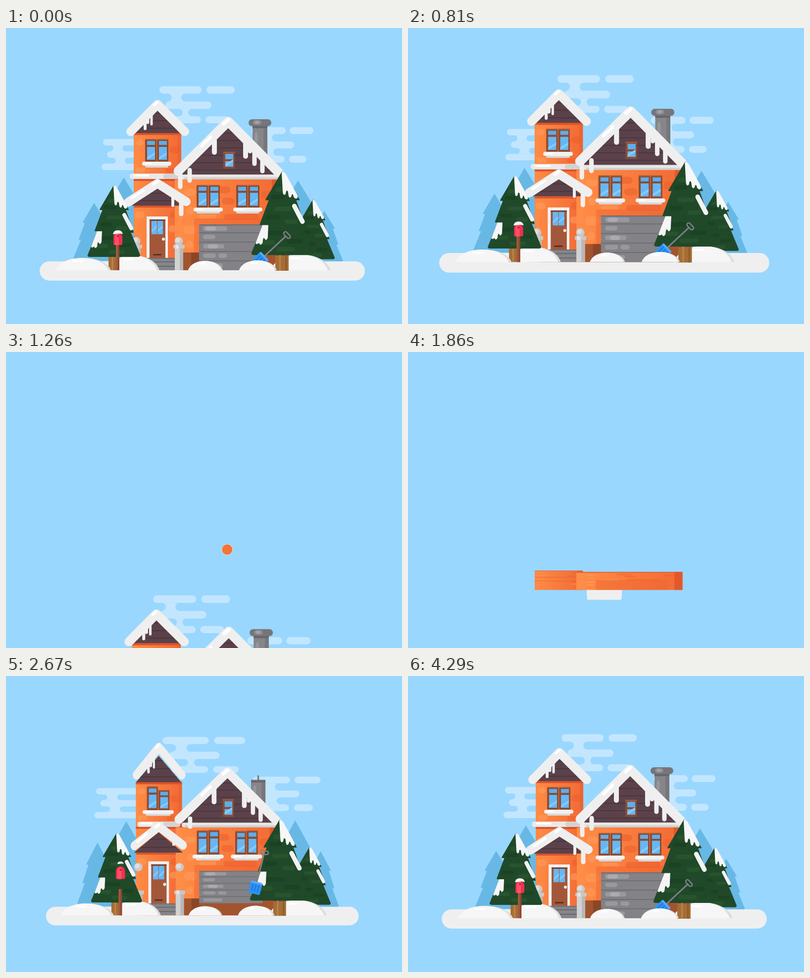
An HTML page for the animation above (4320 ms loop, 800 by 600 pixels).

```html
<!DOCTYPE html>
<html lang="en">
<head>
<meta charset="utf-8">
<title>Winter house</title>
<style>
html, body { margin: 0; width: 100%; height: 100%; overflow: hidden; background: #99d7ff; }
svg { display: block; width: 100vw; height: 100vh; }
</style>
</head>
<body>
<svg id="stage" viewBox="0 0 800 600"></svg>
<script>
const LOOP = 4320;
const EXIT_END = 1420;
const SNOW = '#efefef';

// Shape helpers
const rect = (x, y, w, h, fill, r = 0, extra = '') =>
  `<rect x="${x}" y="${y}" width="${w}" height="${h}" rx="${r}" fill="${fill}" ${extra}/>`;
const pill = (x1, x2, y, h, fill, extra) => rect(x1, y, x2 - x1, h, fill, h / 2, extra);
const path = (d, fill, extra = '') => `<path d="${d}" fill="${fill}" ${extra}/>`;
const line = (d, color, width) =>
  path(d, 'none', `stroke="${color}" stroke-width="${width}" stroke-linecap="round" stroke-linejoin="round"`);
const group = (id, body) => `<g id="${id}">${body}</g>`;
// A part that springs open around (cx, cy) at a start time
const pop = (cx, cy, start, mode, body) => `<g data-pop="${cx} ${cy} ${start} ${mode}">${body}</g>`;
const drip = (x, y1, y2, w, start = 2300) =>
  pop(x, y1, start, 'y', line(`M${x} ${y1}V${y2}`, SNOW, w));

const CLOUD = '#c3e6ff';
const neck = (x1, x2, y, h) => {
  const r = h / 2;
  return path(`M${x1 - r} ${y}a${r} ${r} 0 0 1 0 ${h}H${x2 + r}a${r} ${r} 0 0 1 0 ${-h}z`, CLOUD);
};
const puff = (x1, x2, y, h) => pill(x1, x2, y, h, CLOUD);

function clouds() {
  const middle = puff(310, 395, 118, 15) + puff(405, 462, 118, 15) + neck(335, 354, 133, 16) +
    puff(322, 415, 149, 15) + neck(357, 368, 164, 15) + puff(326, 394, 179, 14) + puff(403, 450, 179, 14);
  const left = puff(196, 300, 225, 13) + neck(217, 235, 238, 12) + puff(204, 300, 250, 13) +
    neck(222, 240, 263, 12) + puff(193, 300, 275, 13);
  const right = puff(496, 565, 201, 14) + puff(573, 621, 201, 14) + neck(515, 537, 215, 15) +
    puff(500, 582, 230, 14) + neck(515, 540, 244, 15) + puff(500, 563, 259, 14) + puff(572, 607, 259, 14);
  return group('cloudM', pop(386, 155, 2390, 'x', middle)) +
    group('cloudL', pop(252, 256, 2390, 'x', left)) +
    group('cloudR', pop(560, 237, 2390, 'x', right));
}

// Trees are drawn 143 units high with the tip at the origin
const TREE = 'M0 0L29 48H23L39 94H33L52 140Q52 143 49 143H-49Q-53 143 -52 140L-32 91H-38L-22 48H-28z';
const place = (x, y, h, body) => `<g transform="translate(${x} ${y}) scale(${h / 143})">${body}</g>`;

const blueTree = (x, y, h, start) => pop(x, y + h, start, 'y',
  place(x, y, h, path(TREE, '#68b8e5', 'stroke="#68b8e5" stroke-width="2" stroke-linejoin="round"')));

function greenTree(x, y, h, start) {
  const bands = [[-12, 12, 26], [-20, 4, 39], [-14, 16, 60], [-28, -4, 74], [4, 27, 82],
    [-26, 8, 102], [-38, -12, 118], [8, 36, 116], [-10, 22, 130]]
    .map(([a, b, top], i) => pill(a, b, top, 8, i % 2 ? '#193f20' : '#2d5a30', 'opacity=".6"')).join('');
  const snow = path('M-1 0Q3 -2 7 5L26 40Q28 46 24 46Q20 46 19 40Q17 36 16 42Q13 47 11 41L10 34Q7 29 6 38Q2 42 1 35z', '#f7f7f7') +
    line('M21 59L35 86', '#f2f2f2', 8) +
    path('M-34 92H-24L-25 114Q-28 121 -31 115Q-33 112 -34 123Q-38 129 -40 123Q-45 127 -46 123z', '#f5f5f5');
  return pop(x, y + h, start, 'xy', place(x, y, h, path(TREE, '#20492a',
    'stroke="#20492a" stroke-width="2" stroke-linejoin="round"') + bands + snow));
}

const trunk = (x, y, w, h) => pop(x + w / 2, y + h, 2200, 'y',
  rect(x, y, w, h, '#a56d36') + rect(x, y, w, 4, '#7d4d26') + rect(x + w * .3, y, 3, h, '#b9854a') +
  rect(x + w * .75, y, 3, h, '#8d5b2c'));

function mound(x, w, h) {
  const hump = w => `M${x} 491C${x + w * .12} ${491 - h * 1.33} ${x + w * .88} ${491 - h * 1.33} ${x + w} 491z`;
  return pop(x + w / 2, 491, 2250, 'xy', path(hump(w), '#dedede') + path(hump(w * .95), '#f6f6f6') +
    pill(x + w * .3, x + w * .5, 491 - h * .82, 4, '#fff'));
}

// Windows
const FRAME = '#8b4c33';
function pane(x, y, w, h, bar, start) {
  const gx = x + 4, gw = w - 7;
  return pop(x + w / 2, y + h, start, 'y', rect(x, y, w, h, FRAME, 1) +
    rect(gx, y + 4, gw, bar - 5, '#5caeec') + rect(gx, y + bar + 3, gw, h - bar - 7, '#66b7f4') +
    path(`M${gx} ${y + h - 9}l${gw} -10v5l${-gw} 10z`, '#86cbff') +
    rect(x, y, w, 2, '#a9603d'));
}
const sill = (x, y) => pop(x + 29.5, y + 6, 2360, 'x',
  rect(x + 6, y + 6, 47, 6, '#d8d8d8', 3) + rect(x, y, 59, 8, '#f1f1f1', 4) + pill(x + 5, x + 20, y + 2, 3, '#fff'));
const casement = (x, y, s1, s2) => pane(x, y, 23, 46, 13, s1) + pane(x + 24, y, 23, 46, 13, s2) + sill(x - 6, y + 46);

// Roofs
function gable(x1, x2, peak, base) {
  const id = 'gable' + x1 + base;
  let planks = '';
  for (let y = base - 11; y > peak; y -= 15) planks += rect(x1, y, x2 - x1, 2, '#4c363e');
  return `<clipPath id="${id}"><path d="M${x1} ${base}L${(x1 + x2) / 2} ${peak}L${x2} ${base}z"/></clipPath>` +
    `<g clip-path="url(#${id})">${rect(x1, peak, x2 - x1, base - peak, '#5b424a')}${planks}</g>`;
}
const chevron = (d, w) => line(d, SNOW, w);

const streaks = list => list.map(([a, b, y, h, c]) => pill(a, b, y, h, c, 'opacity=".55"')).join('');
const LIGHT = '#ff9d5c', DEEP = '#ec5f2e';

function chimney() {
  const cap = rect(490, 185, 46, 14, '#75757a', 7) + pill(499, 516, 187, 9, '#8e8e94') + pill(503, 511, 188, 6, '#a2a2a8');
  return pop(513, 255, 2568, 'y', rect(498, 196, 30, 64, '#85858a') + rect(498, 198, 30, 5, '#66666b') +
    rect(520, 203, 8, 55, '#77777c') + pill(502, 509, 210, 26, '#96969b') + pop(513, 198, 2660, 'x', cap));
}

function towerWall() {
  return group('tower', rect(258, 212, 96, 279, 'url(#wall)') + rect(347, 212, 7, 279, DEEP, 0, 'opacity=".6"') +
    rect(258, 212, 96, 5, '#d9532a') + rect(258, 306, 96, 4, '#d9532a') + rect(258, 360, 96, 4, '#d9532a') +
    streaks([[262, 278, 226, 12, LIGHT], [330, 352, 240, 14, DEEP], [262, 282, 282, 10, LIGHT],
      [322, 350, 284, 9, DEEP], [260, 280, 372, 14, LIGHT], [330, 352, 372, 14, DEEP], [328, 346, 400, 14, LIGHT]]));
}

function mainWall() {
  return group('main', rect(354, 300, 199, 191, 'url(#wall)') + rect(341, 300, 13, 191, '#ff8d47') +
    rect(537, 300, 16, 191, '#e2582b') + rect(341, 300, 212, 7, '#d9532a') +
    streaks([[360, 384, 326, 14, LIGHT], [420, 453, 321, 14, DEEP], [436, 462, 344, 14, DEEP], [364, 380, 362, 16, LIGHT],
      [358, 386, 400, 18, LIGHT], [362, 378, 430, 18, LIGHT], [440, 510, 377, 12, DEEP], [390, 425, 378, 8, LIGHT],
      [515, 535, 330, 16, DEEP]]) + rect(380, 386, 145, 105, DEEP, 0, 'opacity=".4"'));
}

function garage() {
  let door = rect(390, 398, 132, 93, '#828287') + rect(390, 398, 132, 2, '#6e6e73');
  for (let y = 414; y < 490; y += 19) door += rect(390, y, 132, 2, '#6e6e73');
  const lights = [[398, 447, 402], [398, 423, 419], [398, 441, 438], [398, 424, 457], [429, 447, 457], [398, 438, 477]];
  door += lights.map(([a, b, y]) => pill(a, b, y, 9, '#98989d')).join('') +
    pill(403, 424, 402, 9, '#aaaab0') + pill(408, 428, 438, 9, '#aaaab0');
  return pop(450, 491, 2200, 'y', rect(358, 455, 187, 36, '#a2542f') + rect(374, 455, 16, 36, '#8b4629')) +
    pop(450, 398, 2580, 'y', door);
}

function towerTop() {
  return pop(306, 213, 2390, 'y', gable(258, 353, 164, 213)) +
    group('towerSnow', pop(306, 218, 2390, 'squash', chevron('M252 210L306 155L361 210', 18) +
      line('M294 168V195', SNOW, 5) + line('M286 177V191', SNOW, 7) + line('M281 182V204', SNOW, 6) +
      line('M299 156L306 150', '#fff', 5)));
}

function mainTop() {
  return pop(449, 300, 2220, 'y', gable(352, 549, 199, 298) + rect(354, 297, 196, 10, '#e7e7e7', 4) +
    rect(360, 303, 190, 4, '#cfcfcf') + chevron('M348 290L449 189.5L551 293', 19) +
    line('M440 194L449 186', '#fff', 7) + line('M395 239L414 221', '#fff', 6) +
    drip(421, 222, 252, 10) + drip(371, 288, 309, 9, 2560) + drip(484, 230, 260, 10) + drip(493, 236, 250, 8) +
    drip(502, 250, 275, 9) + drip(518, 265, 290, 9)) +
    drip(352, 292, 322, 9, 2720) + pane(439, 251, 23, 34, 16, 2340);
}

function porch() {
  return pop(306, 360, 2390, 'y', gable(254, 356, 322, 360)) +
    group('porchSnow', pop(306, 362, 2390, 'squash', chevron('M247 353L306 315L364 352', 18) +
      line('M298 316L306 311', '#fff', 6) + line('M254 345L278 329', '#fff', 5)) +
    drip(337, 338, 360, 6, 2600)) + drip(354, 350, 377, 9, 2720);
}

function entrance() {
  const glass = x => rect(x, 391, 11, 27, '#66b7f4') + path(`M${x} 410l11 -10v4l-11 10z`, '#86cbff');
  const pillar = x => pop(x, 491, 2250, 'y', rect(x - 8, 445, 17, 46, '#d2d2d2') + rect(x + 2, 445, 7, 46, '#b8b8b8') +
    rect(x - 11, 439, 23, 8, '#c8c8c8', 2) + rect(x - 7, 439, 7, 8, '#e6e6e6'));
  const ball = x => pop(x, 432, 2520, 'xy', `<circle cx="${x}" cy="432" r="8.5" fill="#c9c9c9"/>` +
    `<circle cx="${x - 2}" cy="430" r="5" fill="#dedede"/>`);
  return pop(306, 466, 2310, 'y', rect(284, 382, 43, 84, '#f1f1f1', 1) + rect(290, 388, 32, 78, '#a3573a') +
      rect(290, 388, 32, 3, '#7d3f2a') + glass(294) + glass(306) + rect(297, 458, 17, 3, '#5d3024', 1) +
      '<circle cx="318" cy="428" r="3" fill="#f1f1f1"/>') +
    pop(306, 491, 2250, 'y', rect(270, 466, 72, 25, '#85858a') + rect(270, 473, 72, 2, '#67676c') +
      rect(270, 482, 72, 2, '#67676c') + rect(270, 466, 72, 2, '#6f6f74')) +
    pillar(263) + pillar(349) + group('balls', ball(263) + ball(349));
}

function mailbox() {
  return pop(225, 491, 2250, 'y', rect(222, 436, 7, 55, '#a4593b') + rect(226, 436, 3, 55, '#8b472e')) +
    group('box', pop(226, 440, 2320, 'xy', path('M217 424a9 9 0 0 1 18 0v13q0 3 -3 3h-12q-3 0 -3 -3z', '#f0304f') +
      path('M220 424a6 6 0 0 1 8 -6v22h-8z', '#ff5068') + '<circle cx="226" cy="422" r="2" fill="#b81c39"/>')) +
    group('cap', pop(226, 414, 2590, 'xy', path('M216 418q1 -8 10 -8t10 8q-5 -2 -10 -1t-10 1z', '#f3f3f3')));
}

function shovel() {
  const ribs = [-6, 0, 6].map(x => line(`M${x} -6V8`, '#1b76d6', 2)).join('');
  return group('shovel', pop(0, 0, 2300, 'xy', line('M0 -12V-70', '#808085', 3) +
    rect(-8, -77, 16, 7, 'none', 3.5, 'stroke="#808085" stroke-width="2.5"') +
    rect(-12, -12, 24, 25, '#2f92f4', 3) + rect(-12, -12, 24, 4, '#55abff', 2) + ribs));
}

const stage = document.getElementById('stage');
stage.innerHTML = `<defs><linearGradient id="wall"><stop offset="0" stop-color="#ff8b45"/>
  <stop offset="1" stop-color="#f26a35"/></linearGradient></defs>` +
  rect(0, 0, 800, 600, '#99d7ff') +
  '<circle id="dot" r="11" fill="#f47438" stroke="#e9e3e3" stroke-width="1"/>' +
  group('scene',
    clouds() + blueTree(238, 305, 166, 2315) + blueTree(178, 356, 114, 2390) +
    blueTree(590, 311, 160, 2360) + blueTree(643, 372, 101, 2390) +
    group('ground', rect(68, 473, 657, 39, SNOW, 19.5)) + chimney() +
    group('walls', towerWall() + mainWall()) + casement(281, 225, 2340, 2550) +
    pop(306, 300, 2570, 'x', rect(250, 295, 112, 11, '#e9e9e9', 5) + pill(258, 290, 297, 4, '#fff') +
      rect(318, 295, 44, 11, '#d3d3d3', 5)) +
    garage() + casement(385, 318, 2360, 2380) + casement(465, 318, 2340, 2360) +
    towerTop() + mainTop() + entrance() + porch() + mound(368, 70, 19) +
    greenTree(620, 349, 119, 2250) + mound(535, 121, 32) + trunk(544, 457, 27, 35) +
    greenTree(558, 292, 167, 2250) + shovel() + mound(471, 76, 20) +
    mound(205, 105, 30) + trunk(207, 460, 22, 31) + mound(100, 112, 25) +
    greenTree(218, 320, 143, 2250) + mailbox());

// Motion helpers
const clamp = u => Math.max(0, Math.min(1, u));
const smooth = u => (u = clamp(u), u * u * (3 - 2 * u));
const spring = (t, start, dur = 700) => {
  const u = (t - start) / dur;
  return u <= 0 ? 0 : 1 - Math.exp(-5 * u) * Math.cos(2.5 * Math.PI * u);
};
function keys(t, frames) {
  if (t <= frames[0][0]) return frames[0][1];
  for (let i = 1; i < frames.length; i++) {
    const [t0, a] = frames[i - 1], [t1, b] = frames[i];
    if (t < t1) return a + (b - a) * smooth((t - t0) / (t1 - t0));
  }
  return frames[frames.length - 1][1];
}
// Height still to fall under gravity
const above = (t, start, height) => -Math.max(0, height - .0004 * Math.max(0, t - start) ** 2);

const el = id => document.getElementById(id);
const move = (id, transform) => el(id).setAttribute('transform', transform);
const stretch = (cx, cy, sx, sy) => `translate(${cx} ${cy}) scale(${sx} ${sy}) translate(${-cx} ${-cy})`;
const show = (node, on) => node.setAttribute('display', on ? 'inline' : 'none');
// Scale factors [x, y] of a spring value
const modes = {
  x: s => [s, 1],
  y: s => [1, s],
  xy: s => [s, s],
  squash: s => [Math.min(s, 2 - s), s < 1 ? s : .6 + .4 * s],
};
const poppers = [...stage.querySelectorAll('[data-pop]')].map(node => {
  const [cx, cy, start, mode] = node.dataset.pop.split(' ');
  return { node, cx: +cx, cy: +cy, start: +start, scale: modes[mode] };
});

function exitShift(t) {
  if (t > EXIT_END) return 0;
  return -19.5 * smooth((t - 330) / 480) + .00283 * Math.max(0, t - 810) ** 1.94;
}

function draw(t) {
  const leaving = t < EXIT_END;
  const age = leaving ? t : t - LOOP;
  const b = leaving ? t + LOOP : t;
  const zoom = 1 + age * 1.85e-5;
  move('scene', `translate(0 ${exitShift(t)}) ${stretch(400, 300, zoom, zoom)}`);

  const drift = .0083 * age;
  move('cloudM', `translate(${-drift} 0)`);
  move('cloudL', `translate(${drift} 0)`);
  move('cloudR', `translate(${-drift} 0)`);

  show(el('dot'), t > 1120 && t < 1605);
  move('dot', `translate(${447 - .1235 * (t - 1260)} ${370 + .00215 * (t - 1380) ** 2})`);

  show(el('walls'), b >= 1600);
  move('walls', stretch(405, 491, keys(b, [[1600, .07], [1780, 1.1], [1860, 1.06], [2150, .97], [2400, 1]]), 1));
  move('tower', stretch(306, 491, 1,
    keys(b, [[1600, .08], [1860, .147], [2290, 1.06], [2450, .98], [2600, 1]])));
  move('main', stretch(447, 491, 1,
    keys(b, [[1600, .11], [1860, .2], [2270, 1.06], [2420, .98], [2570, 1]])));
  move('ground', stretch(396.5, 492, keys(b, [[1770, 0], [2230, 1.115], [2440, .96], [2580, 1.01], [2670, .992], [2780, 1]]), 1));

  for (const { node, cx, cy, start, scale } of poppers) {
    const s = spring(b, start);
    show(node, s > 0);
    node.setAttribute('transform', stretch(cx, cy, ...scale(s)));
  }

  move('towerSnow', `translate(0 ${above(b, 2670, 12)})`);
  move('porchSnow', `translate(0 ${above(b, 2670, 7)})`);
  move('balls', `translate(0 ${above(b, 3300, 42)})`);
  move('box', `translate(0 ${above(b, 2700, 25)})`);
  move('cap', `translate(0 ${above(b, 2700, 33)})`);
  const dig = smooth((b - 2690) / 280);
  move('shovel', `translate(${507 + 7 * dig} ${433 + 37 * dig}) rotate(${14.4 + 32.5 * dig})`);
}

const begin = performance.now();
function tick() {
  draw((performance.now() - begin) % LOOP);
  requestAnimationFrame(tick);
}
tick();
</script>
</body>
</html>
```
